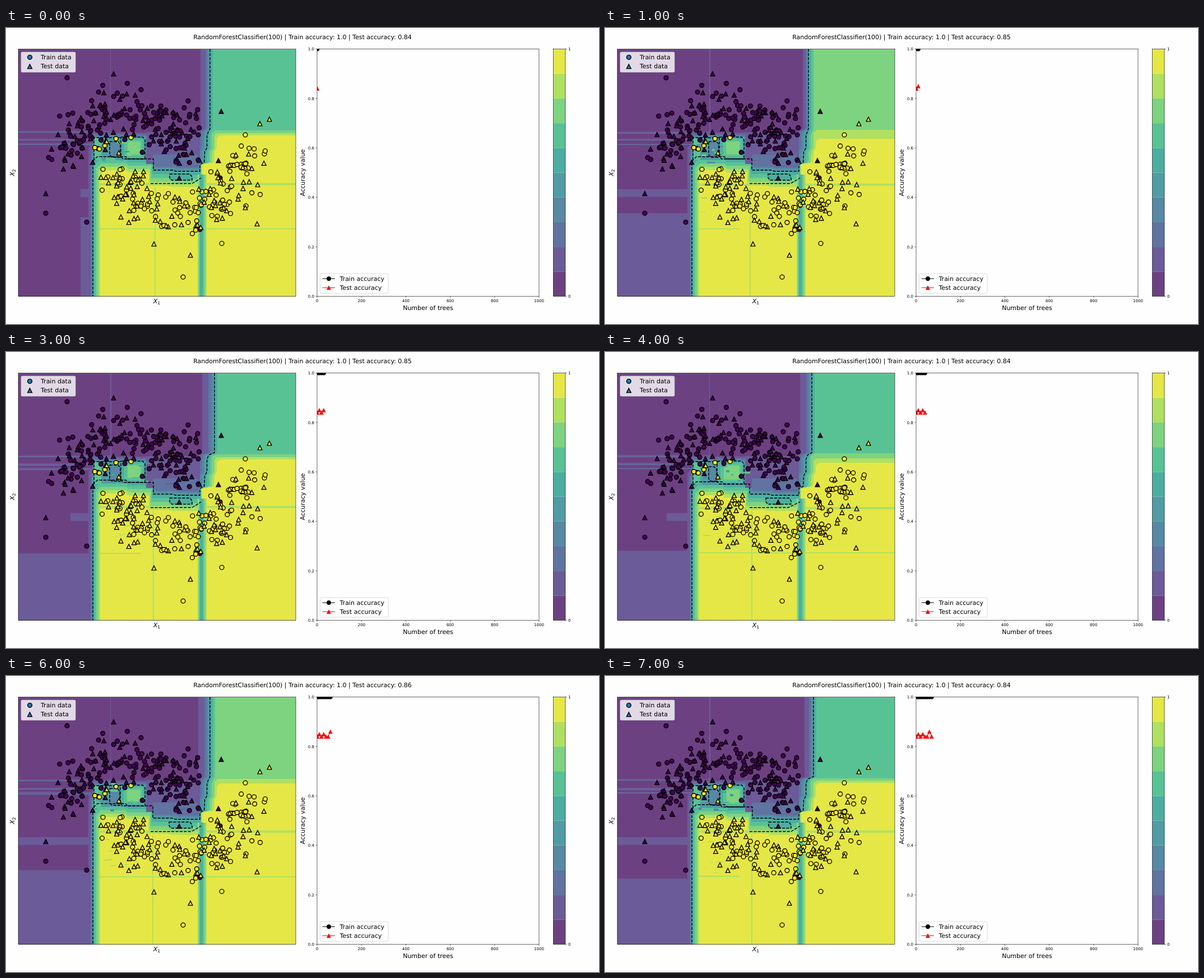
Write an HTML page that moves like this. It is 1058 by 529 pixels and loops after 8 s.

```html
<!DOCTYPE html>
<html lang="en">
<head>
<meta charset="utf-8">
<title>Forest accuracy</title>
<style>
  html, body { margin: 0; width: 100%; height: 100%; overflow: hidden; background: #fefefe; }
  svg { display: block; width: 100vw; height: 100vh; }
  text { font: 11px "DejaVu Sans", Verdana, sans-serif; text-rendering: geometricPrecision; }
  .tick { font-size: 7px; }
  .mid { text-anchor: middle; }
  .end { text-anchor: end; }
  .frame { fill: none; stroke: #000; stroke-width: .6; }
  .field { shape-rendering: crispEdges; }
  .dash { fill: none; stroke: #000; stroke-width: 1.4; stroke-dasharray: 5.2 2.2; }
  .pt { stroke: #000; stroke-width: 1.4; }
  .box { fill: #fff; fill-opacity: .8; stroke: #ccc; stroke-width: .7; }
  .state { visibility: hidden; animation: show 8s step-end infinite; animation-delay: calc((var(--i) - 8) * 1s); }
  @keyframes show { 0% { visibility: visible; } 12.5%, 100% { visibility: hidden; } }
</style>
</head>
<body>
<svg id="chart" viewBox="0 0 1058 529"></svg>
<script>
const LEVELS = ['#6c4182', '#6b5b98', '#6073a1', '#5788a4', '#509ba4',
                '#4caea0', '#59c295', '#7dd37f', '#b0e060', '#e5e746'];
const PURPLE = '#440154', YELLOW = '#fde725';
const L = 22, T = 37.5, R = 517, B = 479.5;

// start, split: ramp beside the corner block; block: its level; low, end: its lower fade;
// floor: top of the lower left area; shelf: left end of the strip above it
const STATES = [
  { acc: .84, start: 347, split: 364, block: 6, low: 183, end: 192, floor: 338, shelf: 133 },
  { acc: .85, start: 353, split: 363, block: 7, low: 182, end: 198, floor: 331, shelf: L },
  { acc: .84, start: 355, split: 362, block: 7, low: 181, end: 204, floor: 331, shelf: L },
  { acc: .85, start: 350, split: 372, block: 6, low: 183, end: 192, floor: 360, shelf: 115 },
  { acc: .84, start: 348, split: 369, block: 6, low: 181, end: 198, floor: 355, shelf: 110 },
  { acc: .84, start: 347, split: 368, block: 6, low: 179, end: 205, floor: 349, shelf: 140 },
  { acc: .86, start: 343, split: 364, block: 7, low: 184, end: 192, floor: 347, shelf: L },
  { acc: .84, start: 356, split: 372, block: 6, low: 183, end: 191, floor: 362, shelf: L }
];

function seeded(a) {
  return () => {
    a = a + 0x6D2B79F5 | 0;
    let t = Math.imul(a ^ a >>> 15, 1 | a);
    t = t + Math.imul(t ^ t >>> 7, 61 | t) ^ t;
    return ((t ^ t >>> 14) >>> 0) / 4294967296;
  };
}

const rect = (x0, y0, x1, y1, attrs) =>
  `<rect x="${x0}" y="${y0}" width="${x1 - x0}" height="${y1 - y0}" ${attrs}/>`;
const area = (k, x0, y0, x1, y1) => rect(x0, y0, x1, y1, `fill="${LEVELS[k]}"`);
const text = (x, y, str, cls = '', attrs = '') => `<text x="${x}" y="${y}" class="${cls}" ${attrs}>${str}</text>`;
const line = (x0, y0, x1, y1, w = .6, color = '#000') =>
  `<path d="M${x0} ${y0}L${x1} ${y1}" stroke="${color}" stroke-width="${w}"/>`;
const dot = (x, y, fill, cls = 'pt') => `<circle cx="${x}" cy="${y}" r="3.9" fill="${fill}" class="${cls}"/>`;
const tri = (x, y, fill, cls = 'pt') => `<path d="M${x} ${y - 3.9}l3.9 7.8h-7.8z" fill="${fill}" class="${cls}"/>`;
const path = pts => 'M' + pts.map(p => p.map(v => v.toFixed(1)).join(' ')).join('L');

// border of level k, from the upper right to the lower left
function edge(k, st, off) {
  const xm = 341 + 4.4 * k, xp = 269 - 2 * k + off.x;
  const yb = k < 5 ? 244 + 3 * k : 256 + 7 * (k - 4);
  const yl = 210 + 6 * k + off.y;
  const xv = k < 5 ? 147 + 4 * Math.sqrt(k) : 155 + 3.2 * (k - 4);
  const row = st.low + (st.end - st.low) * (k - st.block) / (8 - st.block);
  const xr = k < 5 ? st.start + (st.split - st.start) * Math.sqrt(k / 4) : st.split + (k - 4) * 4.5;
  const top = k >= st.block
    ? [[R, row], [xm + 6, row], [xm, row + 5]]
    : [[xr, T], [xr, 180], [Math.min(xr, xm + 3), 184], [xm, 192]];
  return [...top, [xm, 214], [xm - 4, 221], [xm - 5, 240], [342 + k, 244], [342 + k, yb],
    [xp + 40, yb], [xp + 34, yb - 2], [xp, yb - 2], [xp, yl], [216 + off.x, yl],
    [212 + off.x, yl - 4], [xv + 8, yl - 4], [xv, yl + 4], [xv, B]];
}

function field(st, i) {
  const rnd = seeded(41 + i);
  const span = (a, b) => Math.round(a + (b - a) * rnd());
  const off = { x: span(-3, 3), y: span(-2, 2) };
  let out = area(9, L, T, R, B);

  // thin splits crossing the yellow side
  const seam = span(275, 278), base = span(357, 359), column = span(256, 266);
  out += area(8, 168, seam, R, seam + 4) + area(8, 168, base, i % 2 ? 240 : R, base + 2);
  out += area(8, column, 284, column + 2, B);
  for (let n = 0; n < 10; n++) {
    const x = span(168, 235), y = span(290, 358);
    out += area(8, x, y, x + span(3, 12), y + span(1, 2));
  }

  for (let k = 8; k >= 0; k--) {
    const close = [[L, B], [L, T]].concat(k >= st.block ? [[R, T]] : []);
    out += `<path d="${path(edge(k, st, off).concat(close))}Z" fill="${LEVELS[k]}"/>`;
  }

  // purple side: floor, shelf and thin splits
  out += area(1, i ? L : st.shelf, st.floor, 147, B) + area(1, st.shelf, 288, 147, 302);
  for (const y of [184, 199, 207]) {
    const y0 = y + span(-1, 1), h = span(1, 4);
    out += area(1, L, y0, y > 190 ? 155 : 188, y0 + h) + area(2, L, y0 + h, 155, y0 + h + 1);
  }
  out += area(1, 186, T, 187 + i % 2, 190);

  // centre column
  for (let k = 8; k > 4; k--) out += area(k, 342 + 1.4 * (8 - k), 262, 358 - 2.4 * (8 - k), B);

  // mixed zone: blue haze, nested green block, pocket
  out += area(1, 250, 186, 346, 243) + area(2, 262, 226, 342, 246);
  for (let k = 1; k < 5; k++) out += area(k, 153 + k, 184 + 3 * k, 253 - k, 208 + 7 * k + off.y);
  const isles = [];
  for (let k = 5; k < 8; k++) isles.push([k, 173 + 6 * k + off.x, 175 + 4 * k, 268 - 4 * k, 254 - 4 * k + off.y]);
  isles.push([3, 185, 203 + off.y, 202 + off.x, 231], [5, 290 + off.x, 261, 332, 272]);
  out += area(6, 157, 196, 170, 236) + isles.map(r => area(...r)).join('');
  for (let n = 0; n < 18; n++) {
    const x = span(160, 330), y = span(190, 240);
    out += area(x > 250 ? span(1, 2) : span(2, 7), x, y, x + span(3, 18), y + span(1, 4));
  }

  const dash = d => `<path class="dash" d="${d}"/>`;
  const ring = ([, a, b, c, d]) => dash(`M${a} ${b}H${c - 4}L${c} ${b + 5}V${d}H${a + 4}L${a} ${d - 4}Z`);
  return `<g class="field">${out}</g>` + dash(path(edge(4, st, off))) +
    [isles[0], isles[3], isles[4]].map(ring).join('') +
    dash(`M157 236V196H205M258 278H${330 + off.x}L348 268`);
}

// half-moon clouds, kept on their own side of the border
function cloud(count, high, rnd) {
  const noise = s => (rnd() + rnd() + rnd() - 1.5) * 2 * s;
  const fits = high
    ? (x, y) => x > 360 ? y > 205 : y > 284 || (x > 157 && x < 250 && (y > 240 || y > 190 && y < 226))
    : (x, y) => x < 155 ? y < 285 : x < 345 && (y < 228 || x > 262 && y < 242 || x > 262 && y > 262 && y < 284);
  const pts = [];
  while (pts.length < count) {
    const a = Math.PI * rnd();
    const x = (high ? 308 + 112 * Math.cos(a) : 220 + 108 * Math.cos(a)) + noise(21);
    const y = (high ? 232 + 98 * Math.sin(a) : 245 - 92 * Math.sin(a)) + noise(25);
    if (fits(x, y)) pts.push([+x.toFixed(1), +y.toFixed(1)]);
  }
  return pts;
}

function scatter() {
  const rnd = seeded(2024);
  const draw = (shape, fill, count, lone) =>
    [...lone, ...cloud(count, fill === YELLOW, rnd)].map(p => shape(...p, fill)).join('');
  return draw(dot, PURPLE, 132, [[109, 89], [71, 331], [144, 347], [346, 360], [382, 268]]) +
    draw(dot, YELLOW, 112, [[316, 445], [427, 191], [461, 225], [385, 385]]) +
    draw(tri, PURPLE, 84, [[384, 149], [192, 82], [71, 296], [379, 237]]) +
    draw(tri, YELLOW, 86, [[470, 163], [453, 171], [448, 350], [329, 406], [264, 386]]);
}

const px = n => 555 + n * .396;
const py = v => 479.5 - v * 442;

function history(i) {
  const test = STATES.slice(0, i + 1).map((st, n) => [px(n ? n * 10 : 1), py(st.acc)]);
  const train = test.map(([x]) => [x, py(1)]);
  const trace = (pts, shape, color) =>
    `<polyline points="${pts.join(' ')}" fill="none" stroke="${color}"/>` +
    pts.map(p => shape(...p, color, '')).join('');
  return `<g clip-path="url(#plot)">${trace(train, dot, '#000')}${trace(test, tri, 'red')}</g>`;
}

function axes() {
  let out = rect(L, T, R, B, 'class="frame"') + rect(555, T, 951, B, 'class="frame"');
  for (let n = 0; n <= 5; n++) {
    const x = px(n * 200), y = py(n / 5);
    out += line(x, B, x, B + 2.5) + text(x, 490, n * 200, 'tick mid');
    out += line(552.5, y, 555, y) + text(550, y + 2.7, (n / 5).toFixed(1), 'tick end');
  }
  LEVELS.forEach((_, k) => out += area(k, 976.5, py((k + 1) / 10), 998, py(k / 10)));
  out += rect(976.5, T, 998, B, 'class="frame"');
  for (const v of [0, 1]) out += line(998, py(v), 1000.5, py(v)) + text(1003, py(v) + 2.7, v, 'tick');
  const sub = n => `<tspan font-style="italic">X</tspan><tspan dy="1.8" style="font-size:7.7px">${n}</tspan>`;
  const upright = (x, str) => text(0, 0, str, 'mid', `transform="translate(${x} 258.5) rotate(-90)"`);
  return out + text(269, 492, sub(1), 'mid') + upright(15, sub(2)) +
    text(753, 503.5, 'Number of trees', 'mid') + upright(533, 'Accuracy value');
}

function legends() {
  return rect(27, 43, 124, 79, 'rx="2" class="box"') +
    dot(42.5, 52.3, '#1f77b4') + text(62, 55.7, 'Train data') +
    tri(42.5, 68.7, '#1f77b4') + text(62, 72, 'Test data') +
    rect(560.5, 439, 682, 474, 'rx="2" class="box"') +
    line(564.5, 448, 587, 448, 1) + dot(576, 448, '#000', '') + text(595.5, 451.7, 'Train accuracy') +
    line(564.5, 464, 587, 464, 1, 'red') + tri(576, 464, 'red', '') + text(595.5, 468, 'Test accuracy');
}

const title = st => text(529, 19.5,
  `RandomForestClassifier(100) | Train accuracy: 1.0 | Test accuracy: ${st.acc.toFixed(2)}`, 'mid');
const states = draw => STATES.map((st, i) => `<g class="state" style="--i:${i}">${draw(st, i)}</g>`).join('');

document.getElementById('chart').innerHTML =
  `<clipPath id="plot">${rect(555, 37, 951, 480, '')}</clipPath>` +
  states(field) + scatter() + states((st, i) => title(st) + history(i)) + axes() + legends();
</script>
</body>
</html>
```
